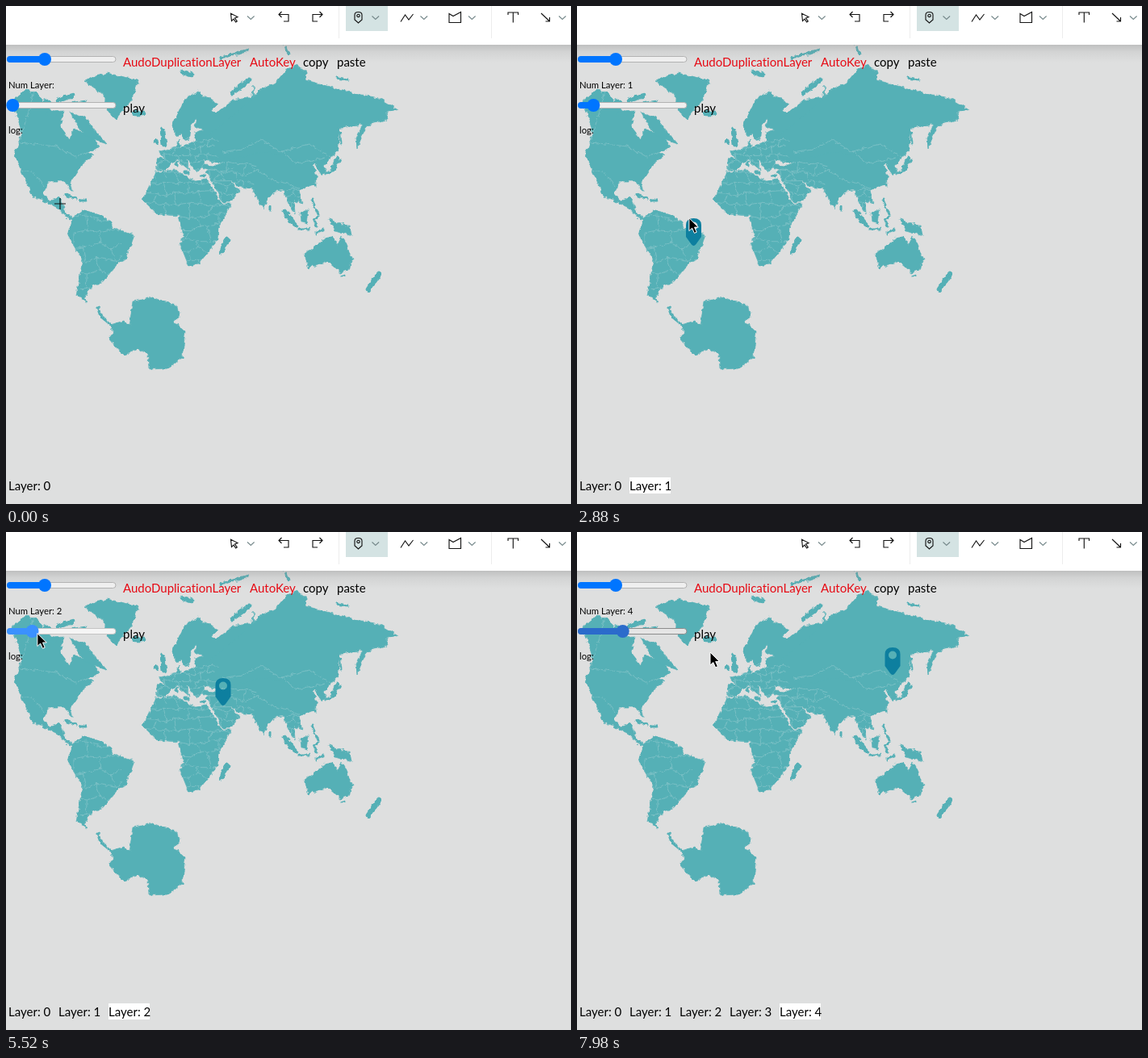
Recreate the animation shown at these times as an HTML page. Size 700x617 px, loop 8000 ms.

```html
<!DOCTYPE html>
<html lang="en">
<head>
<meta charset="utf-8">
<title>Map layers</title>
<style>
html, body { margin: 0; width: 100%; height: 100%; overflow: hidden; background: #dedfdf; }
svg { display: block; }
text { font: 15px Lato, "Open Sans", sans-serif; font-variant-ligatures: none; white-space: pre; }
.small { font-size: 11.3px; }
.red { fill: #e60a14; }
.land { fill: #55b0b6; stroke: #55b0b6; stroke-width: .7; }
.isles { fill: none; stroke: #55b0b6; stroke-width: 3; stroke-linecap: round; stroke-linejoin: round; }
.big { stroke-width: 6.5; }
.borders { fill: none; stroke: #82c3c8; stroke-width: .8; }
.icons { fill: none; stroke: #151515; stroke-width: 1.15; }
</style>
</head>
<body>
<svg width="700" height="617" viewBox="0 0 700 617">
<defs>
  <filter id="rough" filterUnits="userSpaceOnUse" x="0" y="45" width="500" height="420" color-interpolation-filters="sRGB">
    <feTurbulence type="fractalNoise" baseFrequency=".17" numOctaves="2" seed="4"/>
    <feDisplacementMap in="SourceGraphic" scale="6" xChannelSelector="R" yChannelSelector="G"/>
  </filter>
  <linearGradient id="shade" x2="0" y2="1">
    <stop stop-color="#888" stop-opacity=".36"/>
    <stop offset=".4" stop-color="#888" stop-opacity=".13"/>
    <stop offset="1" stop-color="#888" stop-opacity="0"/>
  </linearGradient>
  <clipPath id="onLand"></clipPath>
  <path id="chevron" d="M-4.3-2L0 2 4.300-2" fill="none" stroke="#75888a" stroke-width="1.100"/>
</defs>
<rect width="700" height="617" fill="#dedfdf"/>

<g filter="url(#rough)">
  <g class="land" id="land">
    <!-- North America -->
    <path d="M7 118L24 104 37 107 58 131 72 130 67 149 79 165 84 152 104 160 117 174 102 181 108 185 95 195 79 219 82 230 73 217 52 217 46 232 54 242 67 237 74 257 83 262 77 264 64 250 33 235 10 184 20 157Z"/>
    <path d="M78 131L98 139 125 171 98 162Z"/>
    <!-- Greenland -->
    <path d="M97 92L125 83 164 92 155 117 136 140 126 131 121 110Z"/>
    <!-- South America -->
    <path d="M82 263L94 253 112 257 129 266 133 275 159 284 149 312 139 318 124 338 105 348 97 362 101 368 87 358 95 315 76 284Z"/>
    <!-- Africa -->
    <path d="M186 206L169 240 188 258 214 260 219 284 216 297 226 322 239 319 262 290 263 275 279 245 267 245 249 214 234 217 211 204Z"/>
    <!-- Europe -->
    <path d="M306 98L305 113 280 117 260 133 254 130 262 122 237 106 222 115 207 146 209 160 218 158 223 168 228 162 229 147 236 139 234 149 245 153 235 157 235 167 216 175 214 166 210 175 190 180 197 188 186 189 187 203 197 204 211 190 228 204 223 189 237 206 242 200 265 206 262 198 244 197 245 191 264 194 276 205 310 170Z"/>
    <!-- Northern Asia -->
    <path d="M298 122L312 106 335 94 346 80 360 73 372 82 372 92 402 100 435 109 462 114 486 128 470 132 473 140 446 148 435 177 433 165 441 146 412 152 412 178 393 198 398 206 391 209 382 196 300 205 279 204 275 188 270 188 260 195 250 160Z"/>
    <!-- Southern Asia -->
    <path d="M247 205L258 222 268 243 278 243 289 230 276 214 288 224 305 226 319 252 323 241 333 229 343 228 352 248 358 258 357 241 367 245 363 228 381 221 386 211 380 196 320 180 280 190Z"/>
    <!-- Borneo, New Guinea, Australia -->
    <path d="M365 257L375 252 373 270 366 268ZM400 264L426 274 428 284 408 278Z"/>
    <path d="M370 307L384 297 397 286 405 286 411 297 415 284 430 314 424 327 415 330 397 316 375 325Z"/>
    <!-- Antarctica -->
    <path d="M157 366L182 361 212 372 215 386 207 390 222 404 218 436 201 449 177 450 176 431 164 425 145 432 127 412 134 402 126 396 146 390 153 396Z"/>
  </g>
  <path class="isles big" d="M49 120h5M64 117L82 111M84 122L98 120M54 133h5M159 133H170M219 82L229 85M281 107L301 92M194 154L196 172M186 168h.5M274 290L267 304M411 189L405 202M345 255L358 271M462 332L449 351"/>
  <path class="isles" d="M73 234L87 239M92 241H100M114 374L118 385 129 394M413 153L415 170M397 208L404 204M362 276H376M386 261L381 264 385 273M379 240L387 258M384 281L393 277M327 249v3M383 220v2M211 193v4M221 206h4M241 210h5M417 334h2M266 64L300 55M410 89L424 91M346 51L351 60"/>
  <path class="borders" id="borders" clip-path="url(#onLand)"/>
</g>

<path id="pin" d="M-9.500-25.500Q-9.500-34 0-34T9.500-25.500V-11L3-2Q0 2-3-2L-9.500-11ZM-5-24.500a5 5 0 1 0 10 0a5 5 0 1 0-10 0Z" fill="#0d7f9f" fill-rule="evenodd"/>

<rect y="48" width="700" height="22" fill="url(#shade)"/>
<rect width="700" height="48" fill="#fff"/>
<path d="M412.500 0V40M601.500 0V40" stroke="#ececec"/>
<rect x="421" width="52" height="31" fill="#d4e3e3"/>
<g class="icons">
  <path d="M278.500 9.300L287 13.600 283.500 15 286.300 18.800 284.700 20 282 16.200 279.500 18.500Z"/>
  <path id="undo" d="M341.500 7L338 10.500 341.500 14M338 10.500H350V19H344"/>
  <use href="#undo" transform="translate(730) scale(-1 1)"/>
  <path d="M432 11Q432 7.500 436.500 7.500T441 11V17L436.500 21 432 17ZM434.800 12a1.700 1.700 0 1 0 3.400 0a1.700 1.700 0 1 0-3.400 0"/>
  <path d="M489 19.500L494.500 11 499 17 504.500 10"/>
  <path d="M549 9.500L554 12.500 563.500 7.500V20.500H549Z"/>
  <path d="M622 11V8H634.500V11M628.300 8V20.500M663 9L673.500 19M673.500 14V19H668.500"/>
</g>
<use href="#chevron" x="303.300" y="14.500"/>
<use href="#chevron" x="457.800" y="14.500"/>
<use href="#chevron" x="517.800" y="14.500"/>
<use href="#chevron" x="577.300" y="14.500"/>
<use href="#chevron" x="689.300" y="14.500"/>

<g id="sizeSlider"></g>
<g id="layerSlider"></g>
<text class="red" x="145" y="75">AudoDuplicationLayer</text>
<text class="red" x="302" y="75">AutoKey</text>
<text x="368" y="75">copy</text>
<text x="410" y="75">paste</text>
<text x="145" y="132">play</text>
<text class="small" id="count" x="3" y="102"></text>
<text class="small" x="3" y="158">log:</text>
<g id="layers"></g>

<g id="trash">
  <circle r="32" fill="#6b6c6c" stroke="#ededed" stroke-width="1.800"/>
  <path d="M-12-10H12M-5-10V-14H5V-10M-9-10V10H9V-10M-4-6V6M0-6V6M4-6V6" fill="none" stroke="#d5d5d5" stroke-width="1.700"/>
</g>
<g id="cursor">
  <path id="cross" d="M-7 0H7M0-7V7" stroke="#111" stroke-width="1.200"/>
  <path id="arrow" d="M0 0V16L3.800 12.600 6.600 18.800 9.400 17.600 6.700 11.500H11.500Z" stroke="#fff"/>
  <g id="move">
    <path id="arm" d="M-1.200 0V-3.800H-3.500L0-7.500 3.500-3.800H1.200V0Z" stroke="#fff" stroke-width="2" paint-order="stroke"/>
    <use href="#arm" transform="rotate(90)"/>
    <use href="#arm" transform="rotate(180)"/>
    <use href="#arm" transform="rotate(270)"/>
  </g>
</g>
</svg>
<script>
const LOOP = 8000, STEP = 60;
const PIN_DROP = 600, PRESS = 300, HOLD = 120;

const el = id => document.getElementById(id);
const clamp = v => Math.min(1, Math.max(0, v));
const mix = (a, b, k) => a.map((v, i) => v + (b[i] - v) * k);
const progress = (t, start, end) => clamp((t - start) / (end - start));

// The pointer alternates: slide to the next layer, then drag the pin.
const pinStops = [[62, 239], [144.5, 297], [269, 215], [391, 177]];
const presses = [1115, 3420, 5400, 7500].map(start => ({ start, end: start + PRESS }));
const drags = [
  { start: 1800, end: 2580, grab: [16, -9] },
  { start: 4380, end: 4740, grab: [2, -12] },
  { start: 6300, end: 6585, grab: [2, -12] }
];
const knobX = layer => 8.3 + 12.1 * layer;

const waypoints = [{ t: 0, at: [67, 245] }, { t: PIN_DROP, at: [63, 238] }];
const visit = ({ start, end }, from, to) =>
  waypoints.push({ t: start, at: from }, { t: end, at: to, linear: true }, { t: end + HOLD, at: to });
const grabPoint = (stop, grab) => stop.map((v, i) => v + grab[i]);

presses.forEach((press, n) => {
  visit(press, [knobX(n) + 1.5, 125.5], [knobX(n + 1) + 1.5, 125.5]);
  const drag = drags[n];
  if (drag) visit(drag, grabPoint(pinStops[n], drag.grab), grabPoint(pinStops[n + 1], drag.grab));
});
waypoints.push({ t: 7980, at: [165, 149] });

function pointerAt(t) {
  const next = waypoints.findIndex(p => p.t > t);
  if (next < 1) return waypoints.at(next < 0 ? -1 : 0).at;
  const a = waypoints[next - 1], b = waypoints[next];
  const k = progress(t, a.t, b.t);
  return mix(a.at, b.at, b.linear ? k : k * k * (3 - 2 * k));
}

const pinAt = t => drags.reduce(
  (pos, { start, end }, n) => mix(pos, pinStops[n + 1], progress(t, start, end)), pinStops[0]);

const trashScale = t => Math.max(...drags.map(({ start, end }) =>
  Math.min(progress(t, start, start + 360), 1 - progress(t, end, end + 300))));

const during = (spans, t) => spans.some(s => t >= s.start && t < s.end);

const sliderColors = {
  idle: ['#efefef', '#b2b2b2', '#0075ff'],
  hover: ['#e5e5e5', '#8c8c8c', '#2b6bcb'],
  active: ['#f5f5f5', '#c4c4c4', '#3b91ff']
};

function drawSlider(id, thumb, y, state) {
  const [track, edge, fill] = sliderColors[state];
  el(id).innerHTML =
    `<rect x="1.5" y="${y - 3.5}" width="134.5" height="7" rx="3.5" fill="${track}" stroke="${edge}"/>
     <rect x="1" y="${y - 4}" width="${thumb}" height="8" rx="4" fill="${fill}"/>
     <circle cx="${thumb}" cy="${y}" r="8" fill="${fill}"/>`;
}

function drawLayers(count) {
  let html = '';
  for (let i = 0; i <= count; i++) {
    const x = 3 + 62 * i;
    if (i && i === count) html += `<rect x="${x}" y="584" width="51" height="20" fill="#fff"/>`;
    html += `<text x="${x}" y="600">Layer: ${i}</text>`;
  }
  el('layers').innerHTML = html;
  el('count').textContent = 'Num Layer: ' + (count || '');
}

let seed = 7;
const random = () => (seed = seed * 16807 % 2147483647) / 2147483647;

// Country-like cells: a jittered brick lattice
function cells(x, y, width, height, size) {
  const cols = Math.ceil(width / size), rows = Math.ceil(height / size);
  const points = Array.from({ length: rows + 1 }, (_, r) => Array.from({ length: cols + 1 }, (_, c) =>
    [x + (c + random() * .6) * size, y + (r + random() * .6) * size].map(v => v.toFixed(1))));
  let d = '';
  for (let r = 0; r < rows; r++) for (let c = 0; c < cols; c++) {
    d += `M${points[r][c]}L${points[r][c + 1]}`;
    if ((r + c) % 2) d += `M${points[r][c]}L${points[r + 1][c]}`;
  }
  return d;
}

function drawBorders() {
  el('onLand').innerHTML = el('land').innerHTML;
  el('borders').setAttribute('d',
    'M35 107L20 157M8 168L62 174 87 187 106 180M15 203L33 205 47 224' +
    'M268 182L291 178 316 166 340 180 376 171 402 187M340 180L360 195 395 188M302 198L332 216 348 220 363 227' +
    cells(165, 200, 105, 125, 14) + cells(186, 164, 66, 40, 9) +
    cells(75, 258, 52, 90, 17) + cells(256, 192, 48, 36, 12) + cells(343, 224, 26, 30, 9));
}

function place(id, [x, y], scale = 1) {
  el(id).setAttribute('transform', `translate(${x} ${y}) scale(${scale})`);
}

const show = (id, on) => el(id).setAttribute('visibility', on ? 'visible' : 'hidden');

function draw(t) {
  const count = presses.filter(p => t >= p.start + PRESS / 2).length;
  const shape = t < PIN_DROP ? 'cross' : during(drags, t) ? 'move' : 'arrow';
  // Hover styling trails the pointer slightly
  const [hoverX, hoverY] = pointerAt(t - 100);
  const hover = hoverX < 136 && Math.abs(hoverY - 123) < 9;

  for (const id of ['cross', 'move', 'arrow']) show(id, id === shape);
  place('cursor', pointerAt(t));
  show('pin', t >= PIN_DROP);
  place('pin', pinAt(t));
  place('trash', [365.5, 622.5], trashScale(t));
  drawSlider('layerSlider', knobX(count), 123, during(presses, t) ? 'active' : hover ? 'hover' : 'idle');
  drawLayers(count);
}

function tick() {
  const t = performance.now() % LOOP;
  draw(Math.floor(t / STEP) * STEP);
  requestAnimationFrame(tick);
}

drawBorders();
drawSlider('sizeSlider', 48, 66, 'idle');
tick();
</script>
</body>
</html>
```
